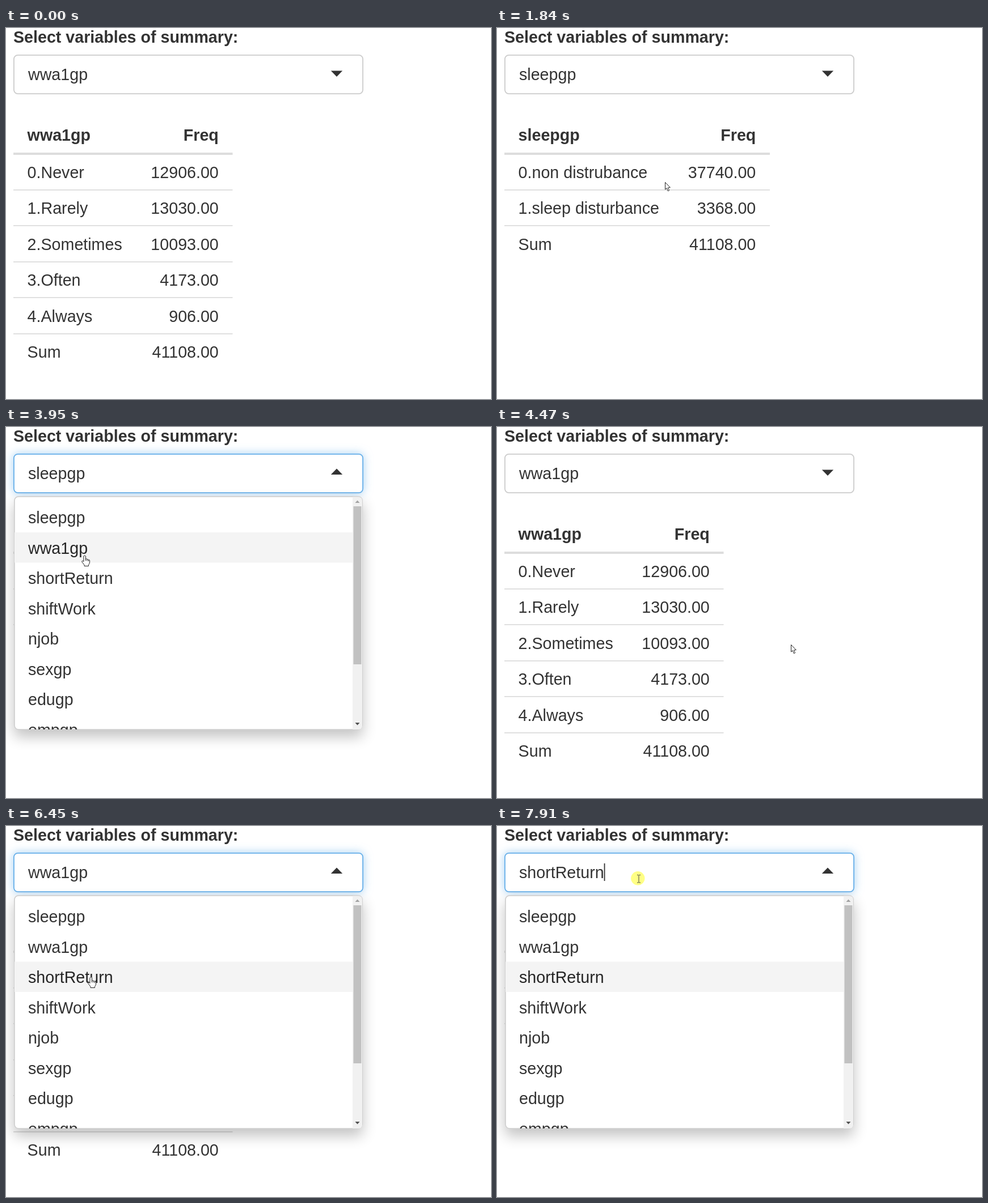
An HTML page with a canvas that plays this animation: 855x655 px, repeating every 8 s.

```html
<!DOCTYPE html>
<html lang="en">
<head>
<meta charset="utf-8">
<title>Variable summary</title>
<style>
html, body { margin: 0; width: 100%; height: 100%; overflow: hidden; background: #fff; }
canvas { display: block; }
</style>
</head>
<body>
<canvas id="stage" width="855" height="655"></canvas>
<script>
const ctx = document.getElementById('stage').getContext('2d');
const LOOP = 8000, TICK = 131.65, LEAD = 12;
const FONT = '28.65px "Liberation Sans", Arial, sans-serif';
const INK = '#333';

const options = ['sleepgp', 'wwa1gp', 'shortReturn', 'shiftWork', 'njob', 'sexgp', 'edugp', 'empgp'];
const tables = [
  { right: 481, rows: [['0.non distrubance', 37740], ['1.sleep disturbance', 3368]] },
  { right: 399.5, rows: [['0.Never', 12906], ['1.Rarely', 13030], ['2.Sometimes', 10093], ['3.Often', 4173], ['4.Always', 906]] },
  { right: 456, rows: [['0.non short return', 39110], ['1.short return', 1998]] }
];

// Each click: tick, list open, chosen option, tick at which the caret blinks off
const clicks = [
  [8, true, 1, 11], [13, false, 0], [25, true, 0, 29], [32, false, 1],
  [43, true, 1, 47], [50, false, 2], [60, true, 2, 64]
];

// Pointer moves: start tick, end tick, x, y
const moves = [
  [1, 2, 770, 636], [2, 7, 112, 63], [8, 11, 116, 161], [13, 16, 811, 590],
  [19, 23, 251, 96], [25, 28, 142, 258], [28, 31, 138, 215], [32, 34, 518, 384],
  [34, 35, 626, 471], [35, 36, 645, 493], [39, 41, 376, 262], [41, 43, 217, 69],
  [46, 49, 150, 266], [50, 52, 602, 375], [52, 53, 621, 383], [56, 60, 250, 93]
];

const ease = p => p * p * (3 - 2 * p);

function stateAt(k) {
  let state = [0, false, 1];
  for (const c of clicks) if (c[0] <= k) state = c;
  const [tick, open, value, caretEnd] = state;
  return { open, value, clicked: tick > 0 && tick === k, caret: open && k < caretEnd };
}

function pointerAt(k) {
  if (k < 2) return null;
  let [, , x, y] = moves[0];
  for (const [from, to, tx, ty] of moves) {
    if (k <= from) break;
    const p = ease(Math.min(1, (k - from) / (to - from)));
    x += (tx - x) * p;
    y += (ty - y) * p;
  }
  return { x: Math.round(x), y: Math.round(y) };
}

function text(str, x, y, { bold = false, align = 'left', color = INK } = {}) {
  ctx.font = (bold ? 'bold ' : '') + FONT;
  ctx.textAlign = align;
  ctx.fillStyle = color;
  ctx.fillText(str, x, y);
}

function rect(x, y, w, h, color) {
  ctx.fillStyle = color;
  ctx.fillRect(x, y, w, h);
}

function poly(points, fill, stroke) {
  ctx.beginPath();
  points.forEach(([x, y]) => ctx.lineTo(x, y));
  ctx.closePath();
  ctx.fillStyle = fill;
  ctx.fill();
  if (stroke) {
    ctx.strokeStyle = stroke;
    ctx.lineWidth = 1;
    ctx.stroke();
  }
}

// Isosceles triangle, h > 0 points down
function triangle(x, y, half, h, color) {
  poly([[x - half, y], [x + half, y], [x, y + h]], color);
}

function panel(x, y, w, h, border, shadow, blur, drop) {
  ctx.save();
  ctx.beginPath();
  ctx.roundRect(x, y, w, h, 8);
  ctx.shadowColor = shadow;
  ctx.shadowBlur = blur;
  ctx.shadowOffsetY = drop;
  ctx.fillStyle = '#fff';
  ctx.fill();
  ctx.restore();
  ctx.beginPath();
  ctx.roundRect(x + .9, y + .9, w - 1.8, h - 1.8, 7);
  ctx.strokeStyle = border;
  ctx.lineWidth = 1.8;
  ctx.stroke();
}

function drawTable(index) {
  const { right, rows } = tables[index];
  const edge = right - 24.7;
  text(options[index], 37.6, 199, { bold: true });
  text('Freq', edge, 199, { bold: true, align: 'right' });
  rect(13, 220, right - 13, 4, '#ddd');
  const total = rows.reduce((sum, row) => sum + row[1], 0);
  [...rows, ['Sum', total]].forEach(([label, n], i) => {
    const y = 265 + i * 63.4;
    if (i) rect(13, Math.round(y - 42.4) - 1, right - 13, 1.8, '#ddd');
    text(label, 37.6, y);
    text(n.toFixed(2), edge, y, { align: 'right' });
  });
}

function drawSelect({ open, value, caret }) {
  panel(13, 47, 617, 70, open ? '#66afe9' : '#ccc',
    open ? 'rgba(102,175,233,.6)' : 'transparent', 16, 0);
  text(options[value], 39, 92);
  if (caret) rect(39 + ctx.measureText(options[value]).width, 66, 1.8, 31, INK);
  if (open) triangle(583, 84, 10.2, -10.5, INK);
  else triangle(583, 75.5, 10.2, 10.5, INK);
}

const overList = p => p && p.x > 14 && p.x < 611 && p.y > 122 && p.y < 534;
const overSelect = p => p.x > 13 && p.x < 630 && p.y > 47 && p.y < 117;

function drawList(active) {
  panel(14, 122, 615, 413, '#d0d0d0', 'rgba(0,0,0,.24)', 24, 12);
  ctx.save();
  ctx.beginPath();
  ctx.roundRect(15, 123.5, 613, 410.5, 6);
  ctx.clip();
  rect(15, 132.5 + active * 53.5, 596, 53.5, '#f4f4f4');
  options.forEach((name, i) =>
    text(name, 39, 170 + i * 53.5, { color: i === active ? '#262626' : INK }));
  rect(611, 123, 17, 411, '#f1f1f1');
  rect(612.5, 140, 14, 279, '#c1c1c1');
  triangle(619.5, 134, 4, -4.5, '#a3a3a3');
  triangle(619.5, 522, 4, 4.5, '#505050');
  ctx.restore();
}

const arrow = () =>
  poly([[.5, .5], [.5, 13], [3.3, 10.6], [5.3, 15.8], [7.6, 14.8], [5.5, 9.9], [9.3, 9.6]], '#fff', '#222');

function hand() {
  ctx.beginPath();
  ctx.moveTo(-2, 11.5);
  ctx.lineTo(-2, 2);
  ctx.quadraticCurveTo(-.2, -.8, 1.5, 2);
  ctx.lineTo(1.5, 7);
  ctx.quadraticCurveTo(3, 5.6, 4, 7.6);
  ctx.quadraticCurveTo(5.6, 6.7, 6.4, 8.5);
  ctx.quadraticCurveTo(8.6, 8, 8.6, 10.5);
  ctx.quadraticCurveTo(9, 15, 6.5, 17.5);
  ctx.lineTo(6.5, 19.5);
  ctx.lineTo(-1, 19.5);
  ctx.lineTo(-1, 17.5);
  ctx.lineTo(-5.2, 12);
  ctx.quadraticCurveTo(-5.2, 8.7, -2, 11.5);
  ctx.closePath();
  ctx.fillStyle = '#fff';
  ctx.fill();
  ctx.strokeStyle = '#222';
  ctx.lineWidth = 1;
  ctx.moveTo(1.5, 7); ctx.lineTo(1.5, 10);
  ctx.moveTo(4, 7.6); ctx.lineTo(4, 10.5);
  ctx.moveTo(6.4, 8.5); ctx.lineTo(6.4, 11);
  ctx.stroke();
}

function beam() {
  rect(-.5, -6, 1, 13, '#444');
  for (const y of [-7, 6.5]) {
    rect(-3, y, 2.5, 1, '#444');
    rect(.5, y, 2.5, 1, '#444');
  }
}

function drawPointer(p, { open, clicked }) {
  if (clicked) {
    ctx.beginPath();
    ctx.arc(p.x - 1.7, p.y - .7, 12.2, 0, Math.PI * 2);
    ctx.fillStyle = 'rgba(255,255,0,.48)';
    ctx.fill();
  }
  let shape = arrow;
  if (overSelect(p)) shape = open ? beam : hand;
  else if (open && overList(p)) shape = hand;
  ctx.save();
  ctx.translate(p.x, p.y);
  shape();
  ctx.restore();
}

function draw(time) {
  const k = Math.floor((time % LOOP + LEAD) / TICK);
  const state = stateAt(k), pointer = pointerAt(k);
  rect(0, 0, 855, 655, '#fff');
  text('Select variables of summary:', 13, 25.5, { bold: true });
  drawTable(stateAt(k - 1).value);
  drawSelect(state);
  if (state.open) {
    const row = overList(pointer) ? Math.floor((pointer.y - 132.5) / 53.5) : state.value;
    drawList(Math.max(0, row));
  }
  if (pointer) drawPointer(pointer, state);
}

const start = performance.now();
function frame() {
  draw(performance.now() - start);
  requestAnimationFrame(frame);
}
frame();
</script>
</body>
</html>
```
